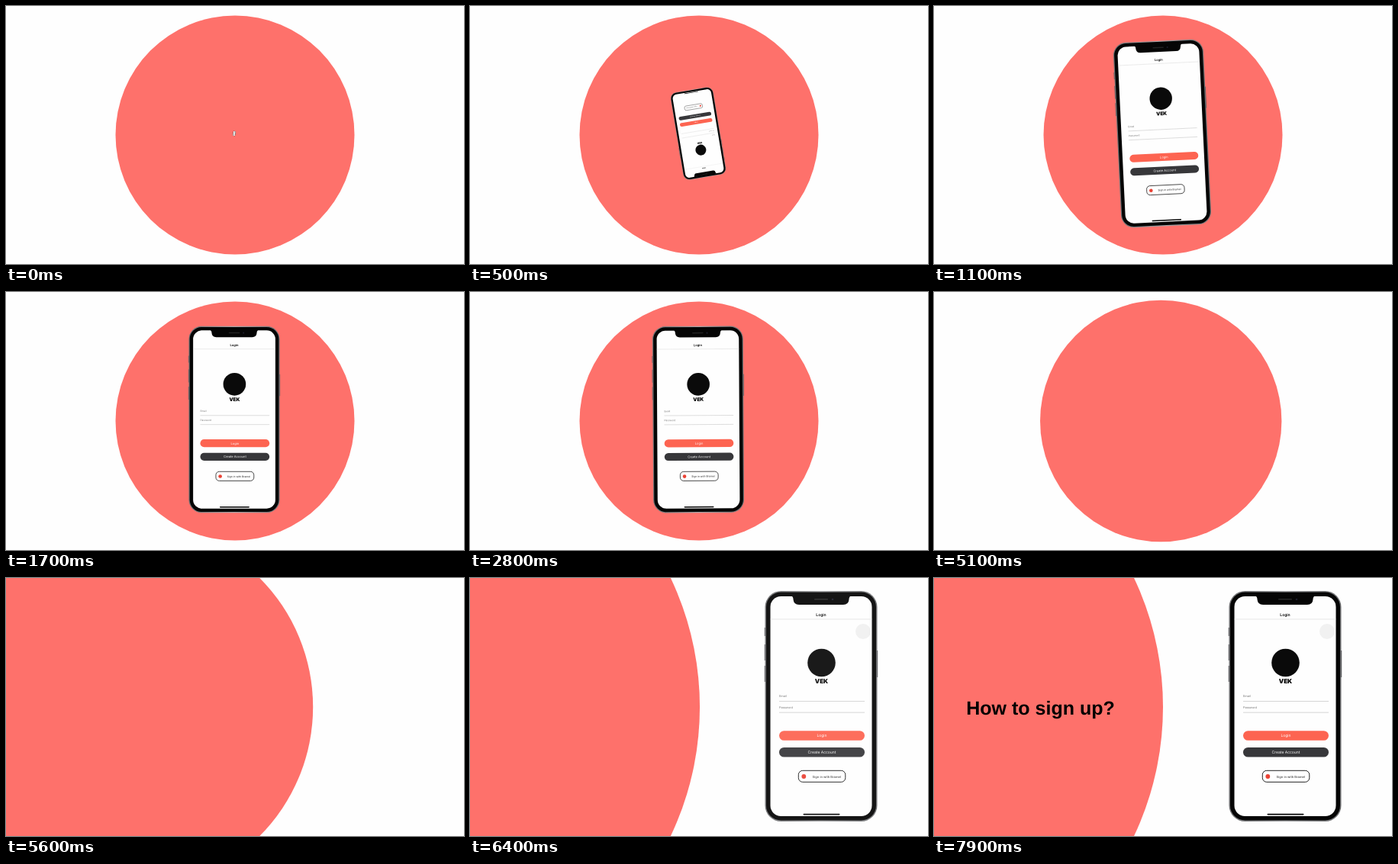
Write an HTML page that moves like this. It is 600x338 px and loops after 8 s.

```html
<!DOCTYPE html>
<html lang="en">
<head>
<meta charset="utf-8">
<title>Sign-up intro</title>
<style>
  html, body { margin: 0; width: 100%; height: 100%; overflow: hidden; background: #fefefe; }
  svg { display: block; width: 100%; height: 100%; }
  text { text-rendering: geometricPrecision; }
  .ui { font-family: Inter, Roboto, sans-serif; text-anchor: middle; }
  .field { font: 3.9px Inter, Roboto, sans-serif; fill: #777; }
  .line { stroke: #c4c4c4; stroke-width: .7; }
  #title { font: bold 25px "Liberation Sans", Arial, sans-serif; }
</style>
</head>
<body>
<svg viewBox="0 0 600 338">
  <defs>
    <linearGradient id="metal">
      <stop offset="0" stop-color="#6d6e70"/>
      <stop offset=".5" stop-color="#a5a6a8"/>
      <stop offset="1" stop-color="#6d6e70"/>
    </linearGradient>
  </defs>
  <circle id="disc" fill="#fe716b"/>

  <!-- Phone, drawn around its own centre -->
  <g id="phone">
    <path d="M-73.6-103v11M-73.6-81v21M-73.6-53v21M73.6-73v35" stroke="#55565a" stroke-width="1.2"/>
    <rect x="-73.5" y="-151" width="147" height="302" rx="21" fill="url(#metal)"/>
    <rect x="-72" y="-149.5" width="144" height="299" rx="19.5" fill="#050505"/>
    <rect x="-66.5" y="-144" width="133" height="288" rx="14" fill="#fefefe"/>
    <path d="M-40-145H40Q36.500-144 36.500-140Q36-133 29-133H-29Q-36-133-36.500-140Q-36.500-144-40-145Z" fill="#050505"/>
    <rect x="-9" y="-141" width="18" height="1.800" rx=".9" fill="#222"/>
    <circle cx="15" cy="-140" r="1.300" fill="#1b1c2a"/>

    <text class="ui" y="-118.500" font-size="5" font-weight="600">Login</text>
    <path class="line" d="M-66.500-114H66.500" style="stroke:#dcdcdc"/>
    <circle id="touch" cx="55" cy="-98" r="10" fill="#f1f1f1"/>
    <circle cx=".5" cy="-57" r="18.300" fill="#0a0a0a"/>
    <text class="ui" x=".5" y="-29.800" font-size="8" font-weight="900">VEK</text>

    <text class="field" x="-55" y="-12.200">Email</text>
    <path class="line" d="M-55-6.500H57M-55 8.200H57"/>
    <text class="field" x="-55" y="2.600">Password</text>

    <rect x="-55" y="32.200" width="112" height="12.600" rx="6.300" fill="#fd6451"/>
    <text class="ui" x="1" y="40.400" font-size="5" fill="#fff">Login</text>
    <rect x="-55" y="54" width="112" height="12.600" rx="6.300" fill="#37373a"/>
    <text class="ui" x="1" y="62.200" font-size="5" fill="#fff">Create Account</text>
    <rect x="-29.700" y="84.300" width="61.500" height="15" rx="5.500" fill="#fff" stroke="#222" stroke-width="1"/>
    <circle cx="-22.700" cy="92" r="2.900" fill="#ea4335"/>
    <text class="ui" x="7.300" y="93.500" font-size="4.100" font-weight="500" fill="#444">Sign in with Bramel</text>
    <rect x="-23.500" y="140.700" width="48" height="1.800" rx=".9" fill="#050505"/>
  </g>

  <text id="title" x="42.300" y="178.500">How to sign up?</text>
</svg>
<script>
  const LOOP = 8000;
  const [disc, phone, touch, title] =
    ['disc', 'phone', 'touch', 'title'].map(id => document.getElementById(id));

  const progress = (t, from, to) => Math.min(1, Math.max(0, (t - from) / (to - from)));
  const smooth = p => p * p * (3 - 2 * p);
  const mix = (a, b, p) => a + (b - a) * p;

  function set(el, attrs) {
    for (const name in attrs) el.setAttribute(name, attrs[name]);
  }

  function draw(t) {
    const slide = smooth(progress(t, 5030, 6470));
    set(disc, { cx: mix(300, -95, slide), cy: 169, r: mix(156.5, 395, slide) });

    // Spin in, spin back out, then fade in at the right
    const second = t > 5000;
    if (second) {
      set(phone, { transform: 'translate(460 168)', opacity: progress(t, 5850, 6440) });
    } else {
      const size = smooth(progress(t, -120, 1167)) - smooth(progress(t, 2780, 3980));
      const angle = 360 * (size - 1);
      set(phone, {
        transform: `translate(299 167) rotate(${angle}) scale(${0.81 * size})`,
        opacity: size > 0 ? 1 : 0
      });
    }
    set(touch, { opacity: second ? 1 : 0 });
    set(title, { opacity: progress(t, 6750, 7500) });
  }

  const start = performance.now();
  function frame() {
    draw((performance.now() - start) % LOOP);
    requestAnimationFrame(frame);
  }
  frame();
</script>
</body>
</html>
```
